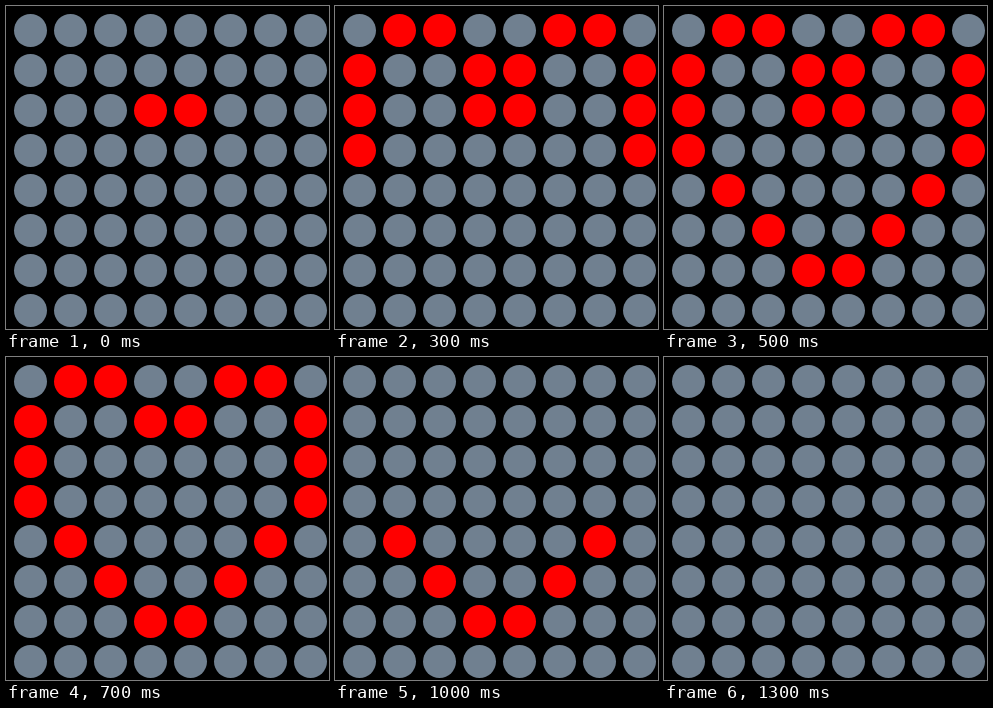
Write an HTML page with a canvas that moves like this. It is 323 px wide and 323 px high and loops after 1400 ms.

```html
<!DOCTYPE html>
<html lang="en">
<head>
<meta charset="utf-8">
<title>LED heart</title>
<style>
  html, body { margin: 0; width: 100%; height: 100%; overflow: hidden; background: #000; }
  canvas { display: block; }
</style>
</head>
<body>
<canvas width="323" height="323"></canvas>
<script>
const ctx = document.querySelector('canvas').getContext('2d');
const STEP = 100, STEPS = 14, SIZE = 8;

// Left half of the heart as [column, row], grouped in drawing order; the right half mirrors it.
const groups = [
  [[3, 2]],
  [[3, 1]],
  [[2, 0], [1, 0]],
  [[0, 1], [0, 2], [0, 3]],
  [[1, 4]],
  [[2, 5]],
  [[3, 6]]
];

// Each group lights in turn, the last two together, then they go out in the same order.
const isLit = (group, step) => step >= Math.min(group, 5) && step < group + 7;

function drawDot(col, row, color) {
  ctx.fillStyle = color;
  ctx.beginPath();
  ctx.arc(24.5 + 40 * col, 24.5 + 40 * row, 16.5, 0, 2 * Math.PI);
  ctx.fill();
}

function draw(step) {
  const lit = new Set();
  groups.forEach((cells, group) => {
    if (!isLit(group, step)) return;
    for (const [col, row] of cells) {
      lit.add(row * SIZE + col);
      lit.add(row * SIZE + SIZE - 1 - col);
    }
  });
  ctx.fillStyle = '#000';
  ctx.fillRect(0, 0, 323, 323);
  for (let i = 0; i < SIZE * SIZE; i++) {
    drawDot(i % SIZE, Math.floor(i / SIZE), lit.has(i) ? '#f00' : '#708090');
  }
}

const start = performance.now();
function tick() {
  draw(Math.floor((performance.now() - start) / STEP) % STEPS);
  requestAnimationFrame(tick);
}
tick();
</script>
</body>
</html>
```
